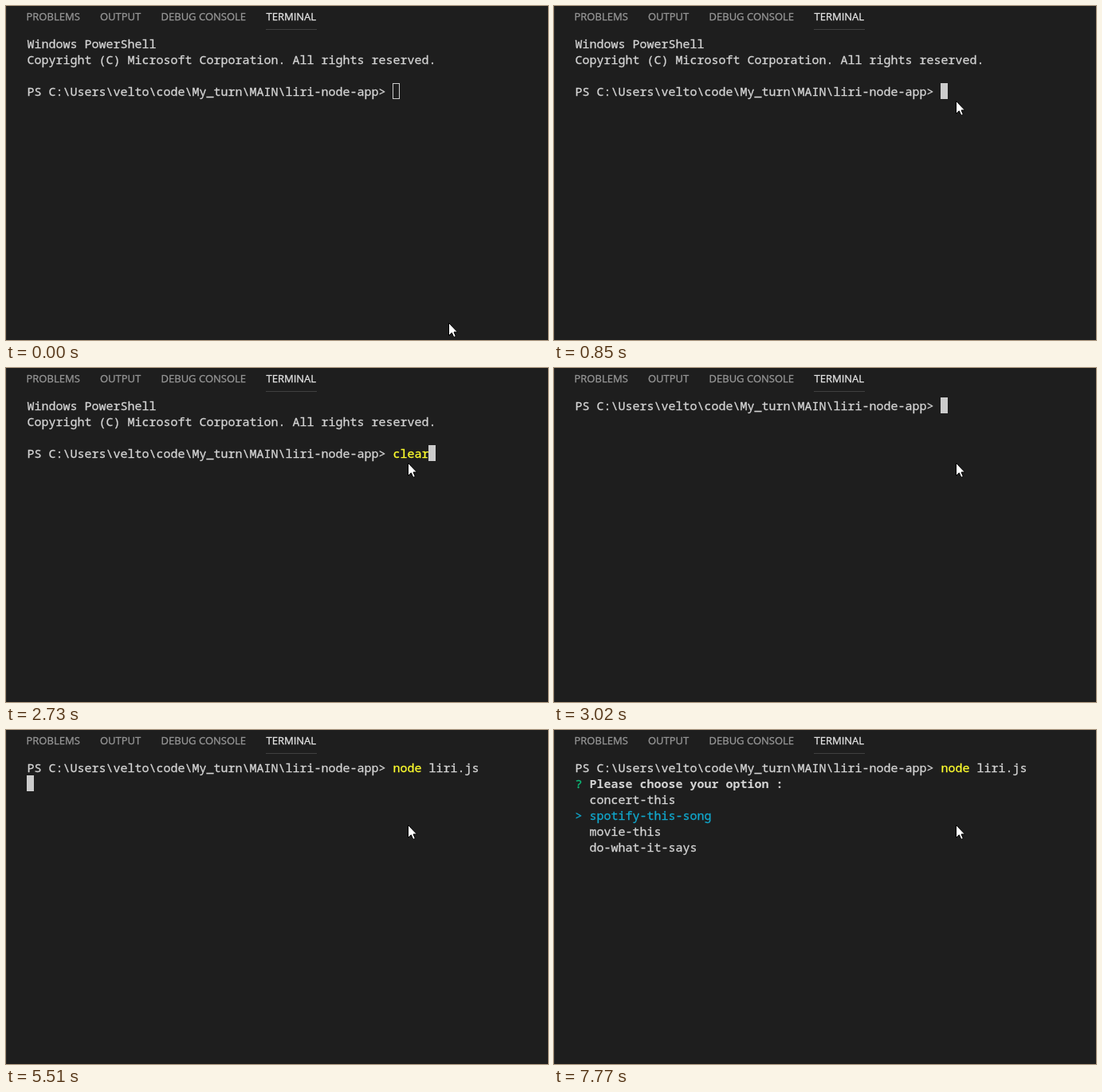
An HTML page that plays this animation: 680 px wide and 420 px high, repeating every 8 s.

```html
<!DOCTYPE html>
<html lang="en">
<head>
<meta charset="utf-8">
<title>Terminal session</title>
<style>
  html, body { margin: 0; width: 100%; height: 100%; overflow: hidden; background: #1e1e1e; }
  svg { display: block; width: 680px; height: 420px; }
  text { white-space: pre; stroke-width: .3px; }
  .tabs { font: 13px "Open Sans", "Noto Sans", sans-serif; fill: #979797; stroke: #979797; }
  .tabs .active { fill: #e7e7e7; stroke: #e7e7e7; }
  #screen { font: 15px "Noto Sans Mono", "DejaVu Sans Mono", monospace; }
</style>
</head>
<body>
<svg viewBox="0 0 680 420">
  <rect width="680" height="420" fill="#1e1e1e"/>
  <rect width="1" height="420" fill="#2a2a2a"/>
  <g class="tabs">
    <text x="25.5" y="18">PROBLEMS</text>
    <text x="118" y="18">OUTPUT</text>
    <text x="194.5" y="18">DEBUG CONSOLE</text>
    <text x="326.5" y="18" class="active">TERMINAL</text>
  </g>
  <rect x="326" y="29" width="64" height="1" fill="#404040"/>
  <rect id="caret" width="8" height="19" stroke="#ccc"/>
  <g id="screen"></g>
  <path id="pointer" d="M.5 .5V16.5L4.3 12.9L6.8 18.5L9.4 17.4L7 12H11.5Z" fill="#fff" stroke="#000"/>
</svg>
<script>
const LOOP = 8000, LEFT = 26, TOP = 37, CELL = 9, ROW = 20;
const TEXT = '#d4d4d4', CARET = '#cccccc', YELLOW = '#ffff2e', GREEN = '#0dbc79', CYAN = '#11a8cd', DARK = '#1e1e1e';
const PROMPT = 'PS C:\\Users\\velto\\code\\My_turn\\MAIN\\liri-node-app> ';
const BANNER = [
  [['Windows PowerShell']],
  [['Copyright (C) Microsoft Corporation. All rights reserved.']],
  []
];
const OPTIONS = ['concert-this', 'spotify-this-song', 'movie-this', 'do-what-it-says'];

const caret = document.getElementById('caret');
const screen = document.getElementById('screen');
const pointer = document.getElementById('pointer');

// A line is a list of [text, color, weight]; a caret is [column, row, filled].
const command = (name, args = '', color = YELLOW) => [[PROMPT], [name, color], [args]];

function typing(at, before, name, args = '', filled = true) {
  const column = PROMPT.length + name.length + args.length;
  return { at, lines: [...before, command(name, args)], caret: [column, before.length, filled] };
}

function menu(at, selected, hint) {
  const choices = OPTIONS.map((option, i) =>
    i === selected ? [['> ' + option, CYAN]] : [['  ' + option]]);
  const question = [['? ', GREEN], ['Please choose your option : ', TEXT, 700], [hint]];
  return { at, lines: [command('node', ' liri.js'), question, ...choices] };
}

const states = [
  typing(0, BANNER, '', '', false),
  typing(850, BANNER, ''),
  { at: 1950, lines: [...BANNER, command('c', '', DARK)], caret: [PROMPT.length, 3, true] },
  ...[2010, 2250, 2410, 2570, 2730].map((at, i) => typing(at, BANNER, 'clear'.slice(0, i + 1))),
  typing(3020, [], ''),
  typing(4260, [], 'clear'),
  typing(4730, [], 'node', ' liri.js'),
  { at: 5510, lines: [command('node', ' liri.js')], caret: [0, 1, true] },
  menu(6140, 0, '(Use arrow keys)'),
  menu(7770, 1, '')
];

function setAttributes(node, attributes) {
  for (const key in attributes) node.setAttribute(key, attributes[key]);
}

function drawLine(line, row) {
  let column = 0;
  for (const [content = '', color = TEXT, weight = 400] of line) {
    if (!content) continue;
    const node = document.createElementNS('http://www.w3.org/2000/svg', 'text');
    setAttributes(node, {
      x: LEFT + column * CELL + 0.4, y: TOP + row * ROW + 16,
      fill: color, stroke: weight === 400 ? color : 'none', 'font-weight': weight
    });
    node.textContent = content;
    screen.append(node);
    column += content.length;
  }
}

function drawState(state) {
  screen.replaceChildren();
  state.lines.forEach(drawLine);
  caret.style.display = state.caret ? '' : 'none';
  if (!state.caret) return;
  const [column, row, filled] = state.caret;
  setAttributes(caret, {
    x: LEFT + column * CELL + 0.5, y: TOP + row * ROW + 0.5, fill: filled ? CARET : 'none'
  });
}

// The pointer glides up to the prompt in discrete steps, then settles.
const moves = [0, 70, 130, 200, 270, 340, 410, 480, 540, 600, 670];
function pointerAt(time) {
  const step = moves.findLast(at => at <= time);
  const glide = Math.min(step / 480, 1);
  const eased = glide * glide * (3 - 2 * glide);
  const settle = Math.min(Math.max((step - 480) / 190, 0), 1);
  return [555 - 51 * eased, 398 - 273 * eased - 6 * settle].map(Math.round);
}

let shown;
function frame() {
  const time = performance.now() % LOOP;
  const state = states.findLast(s => s.at <= time);
  if (state !== shown) drawState(shown = state);
  pointer.setAttribute('transform', `translate(${pointerAt(time)})`);
  requestAnimationFrame(frame);
}
frame();
</script>
</body>
</html>
```
